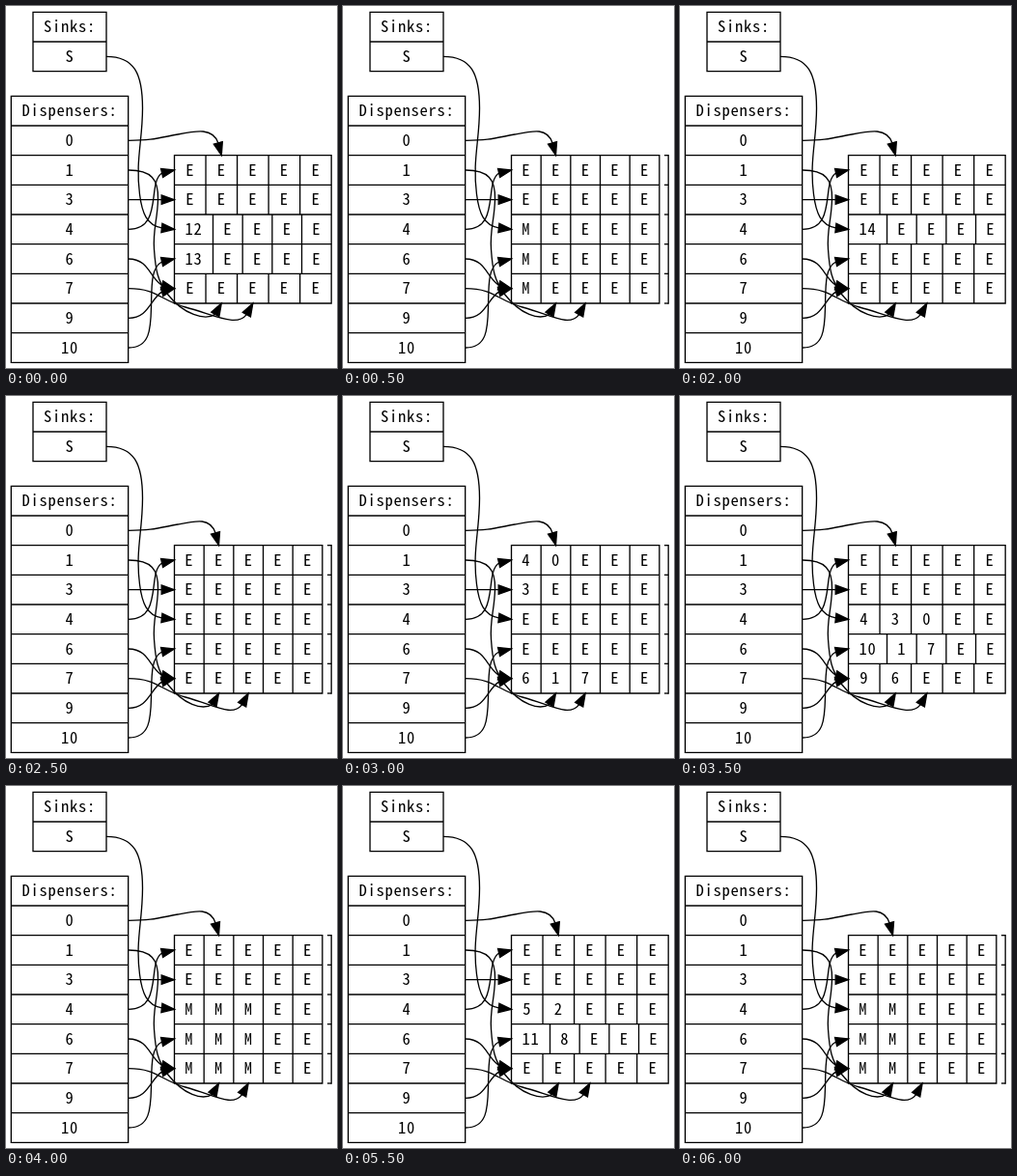
An HTML page that plays this animation: 343 px wide and 375 px high, repeating every 7.5 s.

```html
<!DOCTYPE html>
<html lang="en">
<head>
<meta charset="utf-8">
<title>Dispensers and sinks</title>
<style>
  html, body { margin: 0; width: 100%; height: 100%; overflow: hidden; background: #fff; }
  svg { display: block; width: 343px; height: 375px; }
  path { fill: none; stroke: #000; stroke-width: 1.33; }
  .head { fill: #000; }
  text {
    font: 16.5px "Noto Sans Mono CJK JP", "Noto Sans Mono CJK SC", Inconsolata, "Noto Sans Mono", monospace;
    letter-spacing: .75px;
    text-anchor: middle;
  }
</style>
</head>
<body>
<svg viewBox="0 0 343 375"><g id="fixed"></g><g id="board"></g></svg>
<script>
const ROW = 30.667, LEFT = 174.5, TOP = 154.67, WIDE = 162.67, LOOP = 7500;

// Five rows per step; cells left out are empty (E).
const steps = [
  { at: 0,    rows: ['', '', '12', '13', ''] },
  { at: 500,  rows: ['', '', 'M', 'M', 'M'] },
  { at: 2000, rows: ['', '', '14', '', ''] },
  { at: 2500, rows: ['', '', '', '', ''] },
  { at: 3000, rows: ['4 0', '3', '', '', '6 1 7'] },
  { at: 3500, rows: ['', '', '4 3 0', '10 1 7', '9 6'] },
  { at: 4000, rows: ['', '', 'M M M', 'M M M', 'M M M'] },
  { at: 5500, rows: ['', '', '5 2', '11 8', ''] },
  { at: 6000, rows: ['', '', 'M M', 'M M', 'M M'] }
];

const line = d => `<path d="${d}"/>`;
const label = (x, y, s) => `<text x="${x}" y="${y + 5.6}">${s}</text>`;

// Curve ending at the arrowhead's base (bx, by), with the tip at (x, y).
function arrow(curve, bx, by, x, y) {
  const len = Math.hypot(x - bx, y - by);
  const nx = (by - y) / len * 4.67, ny = (x - bx) / len * 4.67;
  return line(`${curve} ${bx} ${by}`) +
    `<path class="head" d="M${x} ${y}L${bx + nx} ${by + ny}L${bx - nx} ${by - ny}Z"/>`;
}

function list(x, y, w, items) {
  let out = line(`M${x} ${y}h${w}v${ROW * items.length}h${-w}Z`);
  items.forEach((s, i) => {
    if (i) out += line(`M${x} ${y + i * ROW}h${w}`);
    out += label(x + w / 2, y + (i + .5) * ROW, s);
  });
  return out;
}

function fixedParts() {
  return list(28, 6.3, 76, ['Sinks:', 'S']) +
    list(5.33, 93.33, 121.33, ['Dispensers:', 0, 1, 3, 4, 6, 7, 9, 10]) +
    arrow('M104 52.3C133 52.3 141.5 70 141.5 106C141.5 140 134 160 138.5 195C141 215 146 227', 161.4, 229.9, LEFT, 231.3) +
    arrow('M127 200.7L', 161.2, 200.7, LEFT, 200.7) +
    arrow('M127 231.3C163 231.3 146 183', 161.6, 173, LEFT, 170) +
    arrow('M127 262C148 262 149 282', 161.6, 289.3, LEFT, 292.7) +
    arrow('M127 323.3C148 323.3 149 304', 161.6, 296.1, LEFT, 292.7) +
    arrow('M127 354C149 354 150 335 150.5 312C151 290 150 271', 161.6, 265, LEFT, 262);
}

function board(rows) {
  const cells = rows.map(r => {
    const used = r ? r.split(' ') : [];
    return [...used, ...Array(5 - used.length).fill('E')];
  });
  const wide = cells.flat().some(s => s.length > 1);
  const width = wide ? WIDE : ROW * 5;
  const bottom = TOP + ROW * 5;
  const second = LEFT + width * .3, third = LEFT + width * .5;
  let out = line(`M${LEFT} ${TOP}h${width}V${bottom}h${-width}Z`);

  cells.forEach((row, r) => {
    const y = TOP + r * ROW;
    const natural = row.map(s => s.length > 1 ? 40 : ROW);
    const spare = (width - natural.reduce((a, b) => a + b)) / 5;
    let x = LEFT;
    if (r) out += line(`M${x} ${y}h${width}`);
    row.forEach((s, c) => {
      const w = natural[c] + spare;
      if (c) out += line(`M${x} ${y}v${ROW}`);
      out += label(x + w / 2, y + ROW / 2, s);
      x += w;
    });
  });

  // The right-hand edge stays put when the board narrows.
  if (!wide) {
    out += line(`M${LEFT + WIDE} ${TOP - .67}V${bottom + .67}`);
    for (let r = 0; r < 6; r++) out += line(`M333 ${TOP + r * ROW}H${LEFT + WIDE}`);
  }

  return out +
    arrow(`M127 139.3C151 139.3 157 137 178 133C198 129 ${second - 9} 126`, second - 3.5, 141.8, second, TOP) +
    arrow(`M127 170C151 170 158 180 157.5 200C157 222 152 232 153.5 252C155 274 157 284 167 298C184 320 ${second - 17} 326`, second - 6.5, 319.4, second, bottom) +
    arrow(`M127 292.7C157 292.7 160 305 186 312C216 320 ${third - 17} 333`, third - 6.5, 319.6, third, bottom);
}

const boardNode = document.getElementById('board');
document.getElementById('fixed').innerHTML = fixedParts();
let shown = null;

function draw(now) {
  const t = now % LOOP;
  const step = steps.findLast(s => s.at <= t);
  if (step !== shown) {
    boardNode.innerHTML = board(step.rows);
    shown = step;
  }
}

const start = performance.now();
function tick() {
  draw(performance.now() - start);
  requestAnimationFrame(tick);
}
tick();
</script>
</body>
</html>
```
